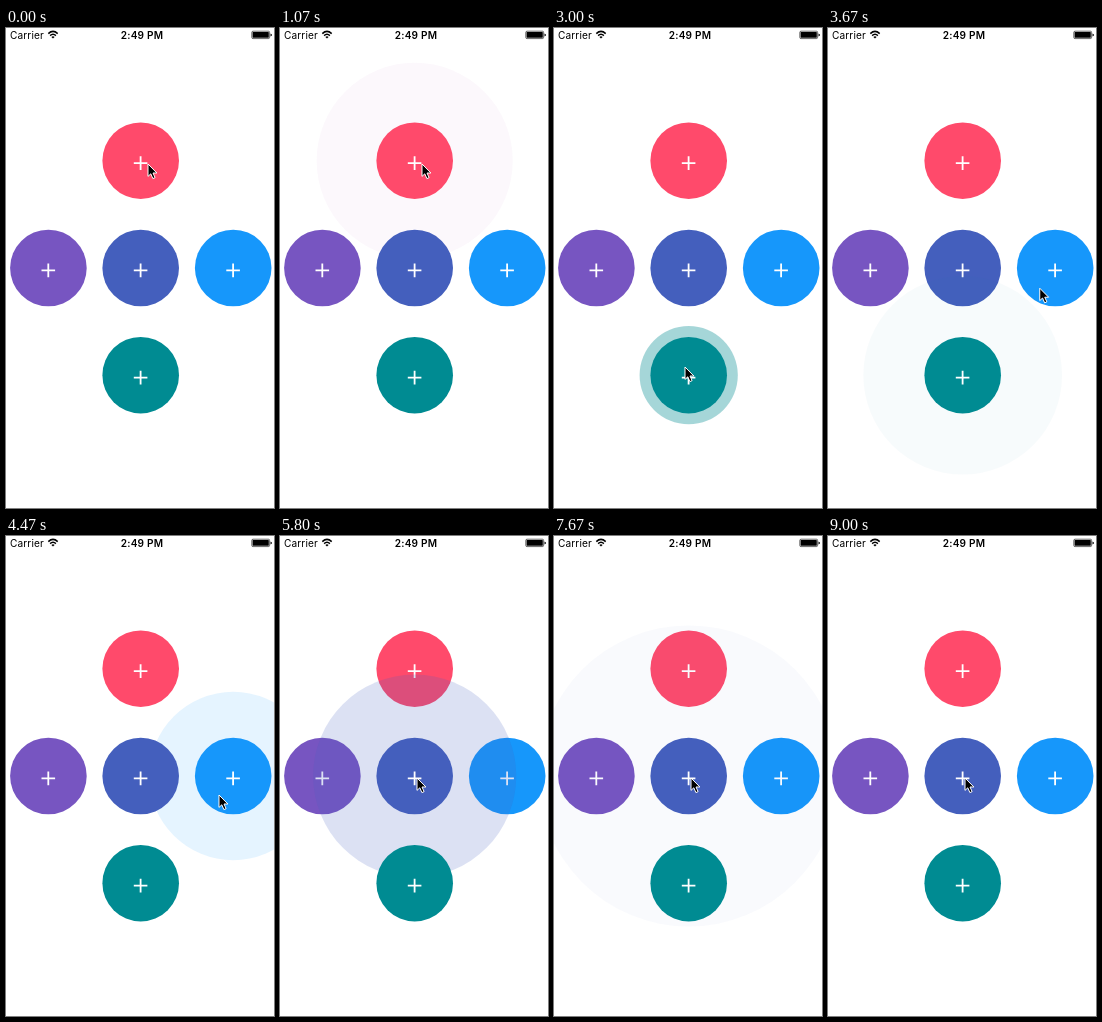
Animation, 268 px wide and 480 px high, one loop 9070 ms. Source, as an HTML page:

```html
<!DOCTYPE html>
<html lang="en">
<head>
<meta charset="utf-8">
<title>Ripple buttons</title>
<style>
  html, body { margin: 0; width: 100%; height: 100%; overflow: hidden; background: #fff; }
  svg { display: block; width: 100vw; height: 100vh; }
  text { font-family: Inter, Roboto, sans-serif; font-size: 10.1px; }
</style>
</head>
<body>
<svg id="stage" viewBox="0 0 268 480">
  <rect width="268" height="480" fill="#fff"/>
  <g id="buttons"></g>
  <g id="status">
    <text x="4" y="10.7" letter-spacing=".12">Carrier</text>
    <text x="136" y="10.7" text-anchor="middle" font-weight="600" letter-spacing=".22">2:49 PM</text>
    <g fill="none" stroke="#000" stroke-width="1.5">
      <path d="M42.3 5.6Q47 1.2 51.7 5.6"/>
      <path d="M44.1 7.6Q47 5 49.9 7.6"/>
    </g>
    <path d="M45.4 8.9Q47 7.6 48.6 8.9L47 10.6Z"/>
    <rect x="245.8" y="3.2" width="17.8" height="7.4" rx="1.2" fill="none" stroke="#000" stroke-width=".6"/>
    <rect x="246.6" y="4" width="16.2" height="5.8" rx=".6"/>
    <path d="M264.5 5.4Q266 6 266 6.9T264.5 8.4Z"/>
  </g>
  <path id="cursor" d="M0 0V12.4L2.8 9.8L4.9 14.6L7.1 13.6L5 9H8.9Z"
        fill="#000" stroke="#fff" stroke-width="1" stroke-linejoin="round"/>
</svg>
<script>
const LOOP = 9070, STEP = LOOP / 136, DURATION = 1000;
const RADIUS = 38.3, ALPHA = 0.43, FAINT = 0.03;
const NS = 'http://www.w3.org/2000/svg';

// Listed from back to front; each ripple sits just below its button.
const buttons = [
  { x: 134.7, y: 132.7, color: '#ff4a6b', tail: '#9b379b', start: 180, end: 1600, grow: 2.6 },
  { x: 42.4, y: 240, color: '#7755c1', start: 1600, end: 2700, grow: 2.6 },
  { x: 227.2, y: 240, color: '#1697fb', start: 3816, end: 5200, grow: 2.6 },
  { x: 134.7, y: 240, color: '#445fbd', start: 5265, end: 8470, grow: 3.93 },
  { x: 134.7, y: 347.2, color: '#008b92', start: 2710, end: 3800, grow: 2.6 }
];

// Cursor stops: arrival, departure, x, y
const stops = [
  [0, 1130, 142, 136],
  [1520, 1950, 43, 245],
  [2600, 3130, 131, 339],
  [3720, 4540, 213, 259],
  [5150, LOOP, 137, 242]
];

const cursor = document.getElementById('cursor');
const layer = document.getElementById('buttons');

function add(tag, attrs) {
  const el = document.createElementNS(NS, tag);
  for (const key in attrs) el.setAttribute(key, attrs[key]);
  return layer.appendChild(el);
}

for (const b of buttons) {
  b.ripple = add('circle', { cx: b.x, cy: b.y, r: RADIUS, fill: b.color, opacity: 0 });
  add('circle', { cx: b.x, cy: b.y, r: RADIUS, fill: b.color });
  add('path', {
    d: `M${b.x - 6.9} ${b.y + 2.4}h13.6m-6.8 -6.8v13.6`,
    fill: 'none', stroke: '#fff', 'stroke-width': 1.8
  });
}

// cubic-bezier(.42, 0, .58, 1)
function easeInOut(x) {
  if (x <= 0) return 0;
  if (x >= 1) return 1;
  let lo = 0, hi = 1, u = 0.5;
  for (let i = 0; i < 20; i++) {
    u = (lo + hi) / 2;
    const v = 1 - u;
    if (1.26 * u * v * v + 1.74 * u * u * v + u * u * u < x) lo = u;
    else hi = u;
  }
  return u * u * (3 - 2 * u);
}

function drawRipple(b, t) {
  const active = t > b.start && t < b.end - 5;
  const p = easeInOut((t - b.start) / DURATION);
  const alpha = ALPHA * (1 - p);
  b.ripple.setAttribute('r', RADIUS * (1 + (b.grow - 1) * p));
  b.ripple.setAttribute('opacity', active ? Math.max(alpha, FAINT) : 0);
  b.ripple.setAttribute('fill', alpha < FAINT && b.tail || b.color);
}

function drawCursor(t) {
  let i = stops.length - 1;
  while (i > 0 && t < stops[i - 1][1]) i--;
  const to = stops[i], from = stops[Math.max(i - 1, 0)];
  const p = i ? easeInOut((t - from[1]) / (to[0] - from[1])) : 1;
  const mix = k => from[k] + (to[k] - from[k]) * p;
  cursor.setAttribute('transform', `translate(${mix(2)} ${mix(3)})`);
}

function draw(ms) {
  const t = Math.floor((ms % LOOP + 4) / STEP) % 136 * STEP;
  for (const b of buttons) drawRipple(b, t);
  drawCursor(t);
}

const origin = performance.now();
function tick() {
  draw(performance.now() - origin);
  requestAnimationFrame(tick);
}
tick();
</script>
</body>
</html>
```
